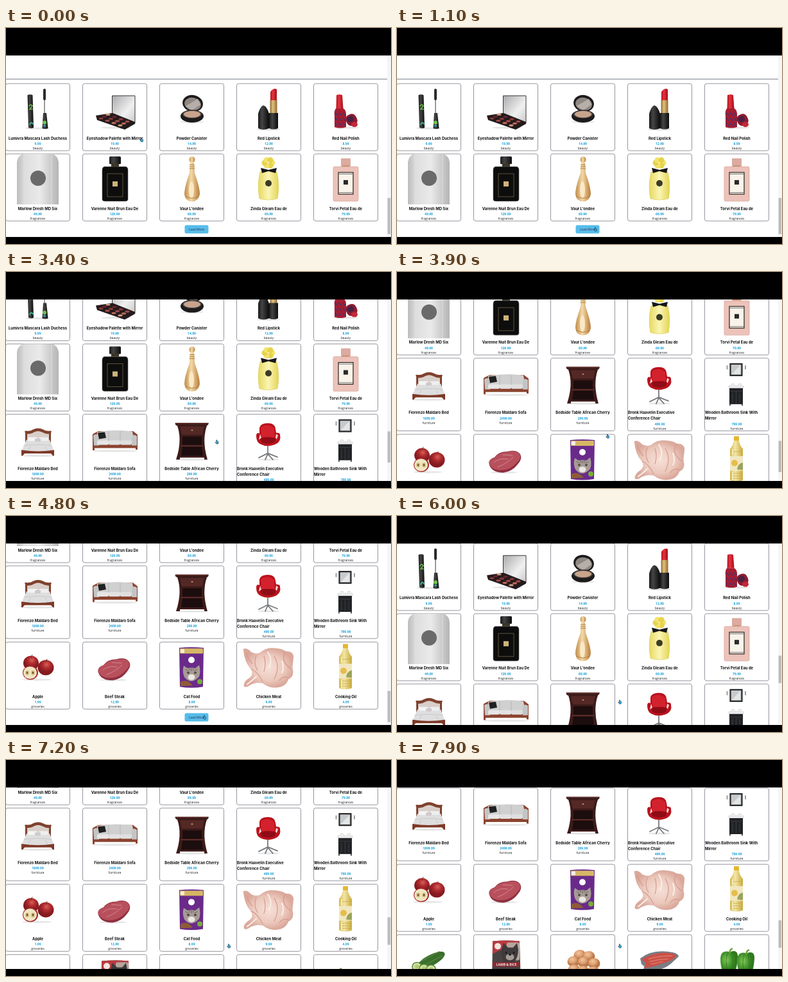
Write an HTML page that moves like this. It is 600x338 px and loops after 8000 ms.

```html
<!DOCTYPE html>
<html lang="en">
<head>
<meta charset="utf-8">
<title>Product list</title>
<style>
  html, body { margin: 0; width: 100%; height: 100%; overflow: hidden; background: #000; }
  svg { display: block; width: 100vw; height: 100vh; }
  text { text-anchor: middle; font-family: "Open Sans", "Noto Sans", sans-serif; }
  .title { font: 700 5.9px Inter, sans-serif; fill: #111; }
  .left { text-anchor: start; }
  .price { font-size: 5px; font-weight: 700; fill: #1fa3dc; }
  .kind { font-size: 4.8px; fill: #222; }
  .card { fill: #fff; stroke: #8b8b95; stroke-width: .9; }
</style>
</head>
<body>
<svg viewBox="0 0 600 338" id="stage">
  <defs>
    <clipPath id="view"><rect y="43" width="600" height="284"/></clipPath>
    <linearGradient id="silver"><stop offset="0" stop-color="#bcbcbc"/><stop offset=".2" stop-color="#dedede"/><stop offset=".55" stop-color="#eaeaea"/><stop offset="1" stop-color="#b5b5b5"/></linearGradient>
    <linearGradient id="mirror" x2="1" y2="1"><stop offset="0" stop-color="#a9aaac"/><stop offset=".6" stop-color="#f0f0f0"/><stop offset="1" stop-color="#c9c9c9"/></linearGradient>
    <linearGradient id="gold"><stop offset="0" stop-color="#8f6a30"/><stop offset=".4" stop-color="#e3c37e"/><stop offset="1" stop-color="#8f6a30"/></linearGradient>
    <linearGradient id="amber"><stop offset="0" stop-color="#c08d4b"/><stop offset=".45" stop-color="#f3d9a8"/><stop offset="1" stop-color="#b97d3a"/></linearGradient>
    <linearGradient id="lemon"><stop offset="0" stop-color="#e7d961"/><stop offset=".5" stop-color="#faf5b4"/><stop offset="1" stop-color="#e4d455"/></linearGradient>
    <linearGradient id="black"><stop offset="0" stop-color="#191919"/><stop offset=".35" stop-color="#444"/><stop offset="1" stop-color="#0c0c0c"/></linearGradient>
    <linearGradient id="red"><stop offset="0" stop-color="#b5121d"/><stop offset=".4" stop-color="#e63240"/><stop offset="1" stop-color="#a30d18"/></linearGradient>
    <linearGradient id="oil"><stop offset="0" stop-color="#d3b94e"/><stop offset=".4" stop-color="#f3e6a6"/><stop offset="1" stop-color="#c9a93c"/></linearGradient>
    <radialGradient id="egg" cx=".4" cy=".3"><stop offset="0" stop-color="#f2c49b"/><stop offset=".6" stop-color="#dfa173"/><stop offset="1" stop-color="#b97848"/></radialGradient>
    <radialGradient id="skin"><stop offset="0" stop-color="#f6e0d7"/><stop offset=".65" stop-color="#ecc9bd"/><stop offset="1" stop-color="#dba99c"/></radialGradient>
    <radialGradient id="green" cx=".35" cy=".4"><stop offset="0" stop-color="#86c95c"/><stop offset=".5" stop-color="#4fa035"/><stop offset="1" stop-color="#2f7a1d"/></radialGradient>
    <radialGradient id="fruit" cx=".55" cy=".3"><stop offset="0" stop-color="#d4615a"/><stop offset=".5" stop-color="#b02a2e"/><stop offset="1" stop-color="#841a20"/></radialGradient>
  </defs>
  <rect width="600" height="338"/>
  <g clip-path="url(#view)">
    <rect y="43" width="600" height="284" fill="#fff"/>
    <g id="page"></g>
    <rect x="594" y="43" width="6" height="284" fill="#f5f5f5"/>
    <rect id="thumb" x="594.600" width="4.600" fill="#bdbdbd"/>
    <path id="hand" d="M-.7-3q.7-.7 1.100 0l.3 1.800 1.700.6.300 2-.7 1.700h-2.300l-2-2.400q0-.8 1-.2l.7.4z" fill="#3ba9dc" stroke="#16364c" stroke-width=".6"/>
  </g>
</svg>
<script>
const box = (x, y, w, h, fill, r = 0, extra = '') =>
  `<rect x="${x}" y="${y}" width="${w}" height="${h}" rx="${r}" fill="${fill}" ${extra}/>`;
const oval = (x, y, rx, ry, fill, extra = '') =>
  `<ellipse cx="${x}" cy="${y}" rx="${rx}" ry="${ry}" fill="${fill}" ${extra}/>`;
const shape = (d, fill, extra = '') => `<path d="${d}" fill="${fill}" ${extra}/>`;
const line = (d, color, w = 1) => shape(d, 'none', `stroke="${color}" stroke-width="${w}" stroke-linecap="round"`);
const turn = (deg, x, y) => `transform="rotate(${deg} ${x} ${y})"`;
const many = (n, draw) => Array.from({ length: n }, (_, i) => draw(i)).join('');
const shade = (x, y, rx) => oval(x, y, rx, 1.6, '#e6e6e6');

const art = {
  mascara: shade(49, 70, 19) + shape('M33.500 18q4-2 8 0l1.500 51q-4 2-8 0z', 'url(#black)') +
    line('M36 35q3-4 5 0l-4 5h4', '#69c04a', 1.500) + line('M37 64q2-5 5-1', '#3bb39a', 2) +
    box(58, 8, 4, 18, '#2b2b2b', 2) + line('M60 25V46', '#222', .9) +
    shape('M58 46h5l2.500 24q-5 2-9 0z', 'url(#black)') + oval(60, 61, 3, 3, '#6cc24a') + oval(60, 66, 2.500, 1.500, '#2f98a5'),
  palette: shade(52, 69, 24) + shape('M45.500 19H81V62L45.500 48z', 'url(#mirror)', 'stroke="#3b3535"') +
    shape('M20 50L46 46 81 60V63L65 72 22 57z', '#241b1c') +
    many(12, i => oval(28 + i % 4 * 10 + (i / 4 | 0) * 5.500, 54.500 + i % 4 * 3.600 - (i / 4 | 0) * 3, 3.600, 1.600,
      ['#8c3a38', '#c26b5b', '#6d2430', '#a74b4c', '#d29a80'][i * 3 % 5])),
  compact: shade(50, 60, 18) + oval(51, 31, 16, 13, '#1d1b1b', turn(12, 51, 31)) + oval(51, 32, 13, 10, '#8f8782', turn(12, 51, 32)) +
    shape('M40 35L59 24 63 33 50 42z', '#b5aea9') + oval(50, 51, 18, 10, '#1d1b1b') + oval(50, 48, 15, 6.500, '#4a4441') + oval(50, 48, 13, 5.200, '#c9a48d'),
  lipstick: shade(49, 72, 18) + shape('M33 70V47Q36 36 41 34Q47 36 50 47V70Q41 74 33 70z', 'url(#black)') +
    shape('M52 28V13Q57 6 62 9V28z', 'url(#red)') + box(51.500, 26, 11, 21, 'url(#gold)') + shape('M50 46H64V70Q57 73 50 70z', 'url(#black)'),
  polish: shade(50, 69, 20) + shape('M35 18q5-2 9 0l1.500 21h-11z', 'url(#red)') +
    shape('M34 39h12q5 3 4 14v15q-9 3-18 0V51q-1-9 2-12z', '#a51d31') +
    many(9, i => line(`M${33 + i % 3 * 6} ${46 + (i / 3 | 0) * 8}l4 4`, '#34377a', 1.200)) +
    box(50, 48, 17, 18, '#8e1c30', 7, turn(-25, 58, 57)) + box(52, 51, 10, 9, '#4a2145', 4, turn(-25, 57, 56)) + oval(63, 64, 5, 4, '#c2283a'),
  grey: shape('M17 79V13Q18 3 27 0H72Q81 3 82 13V79z', 'url(#silver)') + line('M28 1V79M71 1V79', '#e5e5e5', .8) + oval(50, 38, 12, 12, '#6a6a6a'),
  noir: box(41, 4, 18, 12, 'url(#black)', 1.500) + box(44, 15, 12, 5, '#3c3527') +
    shape('M33 20H67Q70 21 70 25V71Q70 74 66 74H34Q30 74 30 71V25Q30 21 33 20z', '#0d0d0d', 'stroke="#555" stroke-width=".6"') +
    box(38, 31, 24, 36, 'none', 0, 'stroke="#80704c" stroke-width=".7"') + box(46, 43, 8, 8, '#cdb479'),
  drop: oval(50, 9, 4.500, 5, 'url(#amber)') + shape('M47 14H53L54 30Q62 52 62 63Q60 74 50 74.500Q39 74 38 63Q38 52 46 30z', 'url(#amber)') +
    line('M46.500 17h7M46.300 20h7.400M46 23h8', '#a5762f', .9) + oval(49, 56, 4, 13, '#fbe8c5') + line('M40 66Q50 73 60 66', '#a8702f', .8),
  lemon: many(6, i => oval(49 + 6 * Math.cos(i * 1.047), 14 + 5 * Math.sin(i * 1.047), 4.500, 4.500, i % 2 ? '#e6d34b' : '#f2e36b')) +
    shape('M36 28H62Q67 49 63 70Q49 74 35 70Q31 49 36 28z', 'url(#lemon)', 'stroke="#d7c644" stroke-width=".6"') +
    shape('M49 25L37 22 39 30 49 27 60 30 62 22z', '#171717') + oval(49, 46, 5, 5, '#3b3a24'),
  pink: box(42, 7, 15, 13, '#dcaaa0', 1) + box(44, 18, 11, 4, '#c59370') + box(30, 20, 39, 54, '#ecc2b9', 2, 'stroke="#d3a196" stroke-width=".7"') +
    box(38, 29, 23, 34, '#faf3e9', 0, 'stroke="#242424" stroke-width="1.200"') + line('M39 31.500H60M39 60.500H60', '#555', .8) + box(46, 41, 7, 7, '#2a2a2a'),
  bed: shade(50, 65, 26) + shape('M30 47V29Q28 26 31 26Q38 27 42 24Q50 20 58 24Q63 27 69 26Q72 26 70 29V47z', '#7f412d') + shape('M33 42V31Q40 31 44 28Q50 25 56 28Q61 31 67 31V42z', '#d9cfca') +
    shape('M32 40H68L75 58H24z', '#dededf') + box(34, 36, 15, 6, '#f4f4f4', 2) + box(51, 36, 15, 6, '#eee', 2) + box(45, 38, 9, 5, '#cfc8cc', 1.5) +
    line('M28 49Q50 46 71 49M38 50L34 58M61 50L65 58', '#c3c3c7', .8) + shape('M24 56Q50 60 75 56V65H73L70 61.500H29L26 65H24z', '#7d3927'),
  sofa: shade(50, 57.5, 36) + shape('M15 35Q14 31 17 30L24 26.500H78L85 32V55.500H82V53H18V56.500H15z', '#8c4430') +
    shape('M22 28Q49 23 77 27L80 45H21z', '#d0d0d0') + shape('M16 33q7-5 9 5v11h-8zM84 34q-8-5-8 5v10h8z', '#c4c4c4') +
    box(22, 41, 18, 7, '#e6e6e6', 2) + box(40, 41, 18, 7, '#e2e2e2', 2) + box(58, 41, 18, 7, '#dfdfdf', 2) +
    line('M40 27V41M58 27V41', '#a5a5a5', .6) + shape('M23 29l11-1 2 9-11 2z', '#202020'),
  bedside: shade(50, 71, 24) + shape('M24 13.500H75.500Q76 17 73 18Q65 41 74 71H69V68H31V71H25Q35 41 27 18Q23 17 24 13.500z', '#3c1b19') +
    shape('M31 19H69L66 32H34z', '#542825') + oval(50, 25, 1.400, 1.200, '#b58a6a') +
    shape('M35 35H65V48H35zM35 51H65L67 65H33z', '#1c0d0e') + line('M24 14.500H75M33 49.500H67', '#693432', 1.200),
  chair: shade(49, 71, 17) + shape('M35 21Q37 14 48 14Q59 14 60 23L61 29Q68 29 67 33Q69 41 62 46Q48 53 37 47Q30 44 30 34Q30 28 35 30z', '#b9131d') +
    shape('M37 21Q48 13 58 22L59 36H38z', '#d3222d') + shape('M36 31l2 6-4 3zM61 31l3 2-2 6-2-2z', '#f3d8d8') + shape('M37 38Q48 34 60 38L59 44Q48 48 38 44z', '#8f0c16') +
    line('M48 50V62M48 61L34 68M48 61L63 67M48 62L44 71M48 62L56 71', '#777b7e', 1.800),
  sink: box(39.5, 9, 18, 18, '#c6cacc', 0, 'stroke="#272727" stroke-width="2.200"') + shape('M42 25L55 11V25z', '#e3e6e6') +
    line('M34.500 12V17M63 12V17', '#888', 1.600) + line('M41 41q3-2 5 0M57 41q-3-2-5 0', '#bbb', .9) + box(37, 43, 23, 4, '#ededed', 1, 'stroke="#bbb" stroke-width=".5"') +
    box(38, 47, 21, 25, '#202225') + line('M40 52H57M48.500 53V70M43 55V69M54 55V69', '#474a4f', .7) + line('M39 72v2M58 72v2', '#222', 1.500),
  apple: shade(48, 59, 23) + oval(39, 33, 12, 11.500, 'url(#fruit)') + oval(62, 40, 12.500, 12, 'url(#fruit)') +
    oval(38, 48, 12, 11, '#a8272c') + oval(37.500, 48, 10.500, 9.800, '#efe6c2') + oval(33, 48, 3, 3.500, '#cfb877') + oval(42, 48, 3, 3.500, '#cfb877') +
    oval(33, 48, 1, 1.800, '#593a22') + oval(42, 48, 1, 1.800, '#593a22') + line('M39 25Q39 22 41 20M62 31L64 27', '#5c3a26', 1),
  steak: shade(47, 59.5, 21) + shape('M24 48Q21 40 32 36Q38 27 52 27Q66 23 72 31Q76 38 68 47Q60 58 46 60Q28 60 24 48z', '#8f3040') +
    shape('M24 46Q22 39 33 36Q39 28 52 28Q66 24 71 31Q75 37 66 45Q57 55 45 56Q28 57 24 46z', '#b8505c') +
    line('M31 44Q40 36 53 39M37 51Q49 47 61 36M45 32L60 33', '#d48f97', .9),
  catfood: shape('M30 9Q49 7 68 9L67 70Q49 73 31 70z', '#6a2a8a') + box(31, 10, 36, 8, '#d6b765', 1) + box(32, 11, 6, 6, '#f4eedd', 1) + oval(49, 28, 5, 5, '#fff') +
    shape('M37 37L43 41Q49 39 55 41L61 36Q64 46 61 54Q49 68 38 55Q34 46 37 37z', '#a79b95') + oval(44, 48, 2, 1.800, '#4b483b') + oval(55, 48, 2, 1.800, '#4b483b') +
    oval(49, 55, 5.500, 4.500, '#ece7e3') + line('M40 43l4 2M58 43l-4 2M49 41v4M46 41v3M52 41v3', '#6d6360', 1) + shape('M32 62Q43 57 51 68L32 69z', '#8d5c35') + oval(62, 62, 4, 4, '#77ae3a'),
  chicken: shape('M10 11Q16 9 22 16Q30 20 36 17Q46 8 60 10Q72 11 76 15Q86 14 88 22L86 40Q90 54 80 58Q76 70 62 71Q50 72 40 64Q30 62 22 66Q14 72 11 69Q10 62 20 56Q27 50 22 42Q12 32 10 11z', 'url(#skin)', 'stroke="#d5a396" stroke-width=".6"') +
    line('M22 42Q32 46 40 62M76 15Q66 28 84 42M30 21Q25 33 32 44M58 22Q68 38 58 58M14 16Q18 28 24 34M66 60Q72 52 80 56M42 22Q46 34 42 46', '#d49a8e', 1.200) +
    line('M48 16Q56 28 50 40M70 30Q74 40 70 48M30 54Q24 60 16 66', '#fbeee8', 2),
  oil: box(45, 3, 8, 7, '#e3b732', 1) + shape('M45 10H53Q54 17 59 23V72Q49 76 39 72V23Q44 17 45 10z', 'url(#oil)') +
    box(39, 34, 20, 23, '#f1e7c0') + oval(46, 45, 5, 5, '#e6bd4c') + shape('M50 55Q51 46 59 44V56z', '#9aa35a') +
    line('M41 27H57M41 61H57M41 65H57M41 69H57', '#c2a443', .7) + line('M43 24V32M43 59V71', '#fbf5d6', 1.500),
  cucumber: oval(53, 40, 24, 8.500, '#3b6f2c', turn(-28, 53, 40)) + line('M37 42L66 26M42 48L70 33', '#64924a', 1) +
    [[31, 50], [42, 53], [53, 54]].map(([x, y]) => oval(x, y, 8, 7.500, '#4d8338') + oval(x, y, 6.600, 6.200, '#cddf9b') + oval(x, y, 3, 2.800, '#aeca76')).join(''),
  dogfood: shape('M29 10Q51 8 71 10L73 75H28z', '#4a4242') + shape('M29 10Q51 8 71 10V20Q50 18 29 30z', '#b83a40') + box(51, 12, 20, 28, '#b5a59d', 3) + oval(37, 18, 5, 5, '#f2e5df') +
    shape('M43 23L46 13 53 20 61 20 67 13 69 23Q69 36 62 43H48Q41 36 43 23z', '#3f3a3b') + oval(56, 35, 6.500, 5, '#a39a96') + oval(56, 31, 2, 1.500, '#111') +
    oval(50, 28, 1.200, 1.200, '#111') + oval(62, 28, 1.200, 1.200, '#111') + box(29, 43, 43, 7, '#8f2a31') + '<text x="50.500" y="48.500" font-size="5" font-weight="700" fill="#eee">LAMB &amp; RICE</text>',
  eggs: shade(52, 66, 28) + [[45, 32], [59, 34], [35, 42], [51, 43], [67, 45], [36, 55], [50, 57], [66, 58]]
    .map(([x, y]) => oval(x, y, 9.500, 8.300, 'url(#egg)')).join(''),
  salmon: shape('M19 37Q34 25 57 26Q78 27 79 34L66 46Q50 59 20 57Q30 51 21 46z', '#777e86') + shape('M21 39Q37 28 58 28Q76 29 75 34Q68 41 54 45Q38 51 24 52Q33 46 21 39z', '#cb5148') +
    line('M32 38Q48 33 68 33M34 42Q48 38 62 38M36 46Q46 44 54 42', '#e69284', .9),
  peppers: [[39, 38], [65, 40]].map(([x, y]) => shape(`M${x} ${y - 11}q13-5 12 9q-2 25-8 24h-11q-8-3-8-23q1-14 15-10z`, 'url(#green)') +
    line(`M${x + 2} ${y - 9}q4 13 0 28M${x - 4} ${y - 9}q-4 12 0 28`, '#34791f', .9) + line(`M${x} ${y - 10}q-1-4 3-6`, '#69a33e', 2.500)).join('')
};

const rows = [
  { y: 87, load: 0, kind: 'beauty', items: [['Lumivra Mascara Lash Duchess', '9.99', 'mascara'], ['Eyeshadow Palette with Mirror', '19.99', 'palette'],
    ['Powder Canister', '14.99', 'compact'], ['Red Lipstick', '12.99', 'lipstick'], ['Red Nail Polish', '8.99', 'polish']] },
  { y: 197, load: 0, kind: 'fragrances', items: [['Marlow Dresh MD Six', '49.99', 'grey'], ['Varenne Nuit Brun Eau De', '129.99', 'noir'],
    ["Vaur L'ondee", '89.99', 'drop'], ['Zinda Gleam Eau de', '69.99', 'lemon'], ['Torvi Petal Eau de', '79.99', 'pink']] },
  { y: 307, load: 1, kind: 'furniture', h: 113.8, items: [['Fiorenzo Maldaro Bed', '1899.99', 'bed'], ['Fiorenzo Maldaro Sofa', '2499.99', 'sofa'],
    ['Bedside Table African Cherry', '299.99', 'bedside'], ['Bronk Haavelin Executive|Conference Chair', '499.99', 'chair'], ['Wooden Bathroom Sink With|Mirror', '799.99', 'sink']] },
  { y: 426.2, load: 1, kind: 'groceries', items: [['Apple', '1.99', 'apple'], ['Beef Steak', '12.99', 'steak'],
    ['Cat Food', '8.99', 'catfood'], ['Chicken Meat', '9.99', 'chicken'], ['Cooking Oil', '4.99', 'oil']] },
  { y: 536.4, load: 2, kind: 'groceries', items: ['cucumber', 'dogfood', 'eggs', 'salmon', 'peppers'].map(name => ['', '', name]) }
];

function card([title, price, picture], i, row) {
  const lines = title.split('|');
  const drop = lines.length > 1 ? 8.8 : 0;
  const titles = lines.map((t, n) => `<text class="title ${drop ? 'left' : ''}" x="${drop ? 0 : 49.5}" y="${87.5 + n * 9}">${t}</text>`).join('');
  return `<g transform="translate(${i * 120} ${row.y})">
    <rect class="card" x="-.5" y="0" width="100" height="${row.h || 105}" rx="3"/>
    <g class="picture">${art[picture]}</g>${titles}
    <text class="price" x="49.500" y="${95.9 + drop}">${price}</text>
    <text class="kind" x="49.500" y="${102.9 + drop}">${price && row.kind}</text></g>`;
}

const $ = id => document.getElementById(id);
$('page').innerHTML = line('M0 80H594', '#737985', 1) +
  [0, 1, 2].map(n => `<g id="load${n}">${rows.filter(r => r.load === n)
    .map(r => r.items.map((item, i) => card(item, i, r)).join('')).join('')}</g>`).join('') +
  `<g id="more">${box(278.5, 308.5, 37, 13, '#55bdea', 2.5)}<text x="297" y="316.800" font-size="4.800" fill="#40264f">Load More</text></g>`;

const LOOP = 8000, PAGE = 1400, STEP = 229, VIEW = 284, TRACK = 274;
const scrollSteps = [[0, 0], [2920, 0], [3900, 172], [4250, 229], [5050, 229], [5500, 0], [5750, 0], [6000, 44], [6800, 169], [7400, 263]];
const handX = [[0, 211], [250, 214], [950, 309], [2000, 309], [2700, 329], [3900, 328], [4300, 328], [4650, 309], [4950, 309], [5300, 347]];
const handY = [[0, 175], [250, 180], [950, 315], [2000, 315], [2700, 266], [3500, 266], [3900, 257], [4300, 257], [4650, 315], [4950, 315], [5300, 291]];

function at(steps, t) {
  const n = steps.findIndex(([time]) => time > t);
  if (n < 0) return steps[steps.length - 1][1];
  const [t0, a] = steps[n - 1], [t1, b] = steps[n];
  return a + (b - a) * (t - t0) / (t1 - t0);
}

function draw(now) {
  const t = now % LOOP;
  const loads = t < 1500 ? 0 : t < 4900 ? 1 : 2;
  const scroll = at(scrollSteps, t);
  const ratio = TRACK / (PAGE + loads * STEP);
  $('page').setAttribute('transform', `translate(0 ${-scroll})`);
  $('load1').style.display = loads > 0 ? '' : 'none';
  $('load2').style.display = loads > 1 ? '' : 'none';
  $('load1').querySelectorAll('.picture').forEach(p => p.style.opacity = t < 1900 ? 0 : 1);
  $('more').setAttribute('transform', `translate(0 ${loads * STEP})`);
  $('more').style.display = loads > 1 ? 'none' : '';
  $('thumb').setAttribute('y', 47.5 + (PAGE - VIEW + scroll) * ratio);
  $('thumb').setAttribute('height', VIEW * ratio + 1);
  $('hand').setAttribute('transform', `translate(${at(handX, t)} ${at(handY, t)})`);
}

const start = performance.now();
(function tick() {
  draw(performance.now() - start);
  requestAnimationFrame(tick);
})();
</script>
</body>
</html>
```
